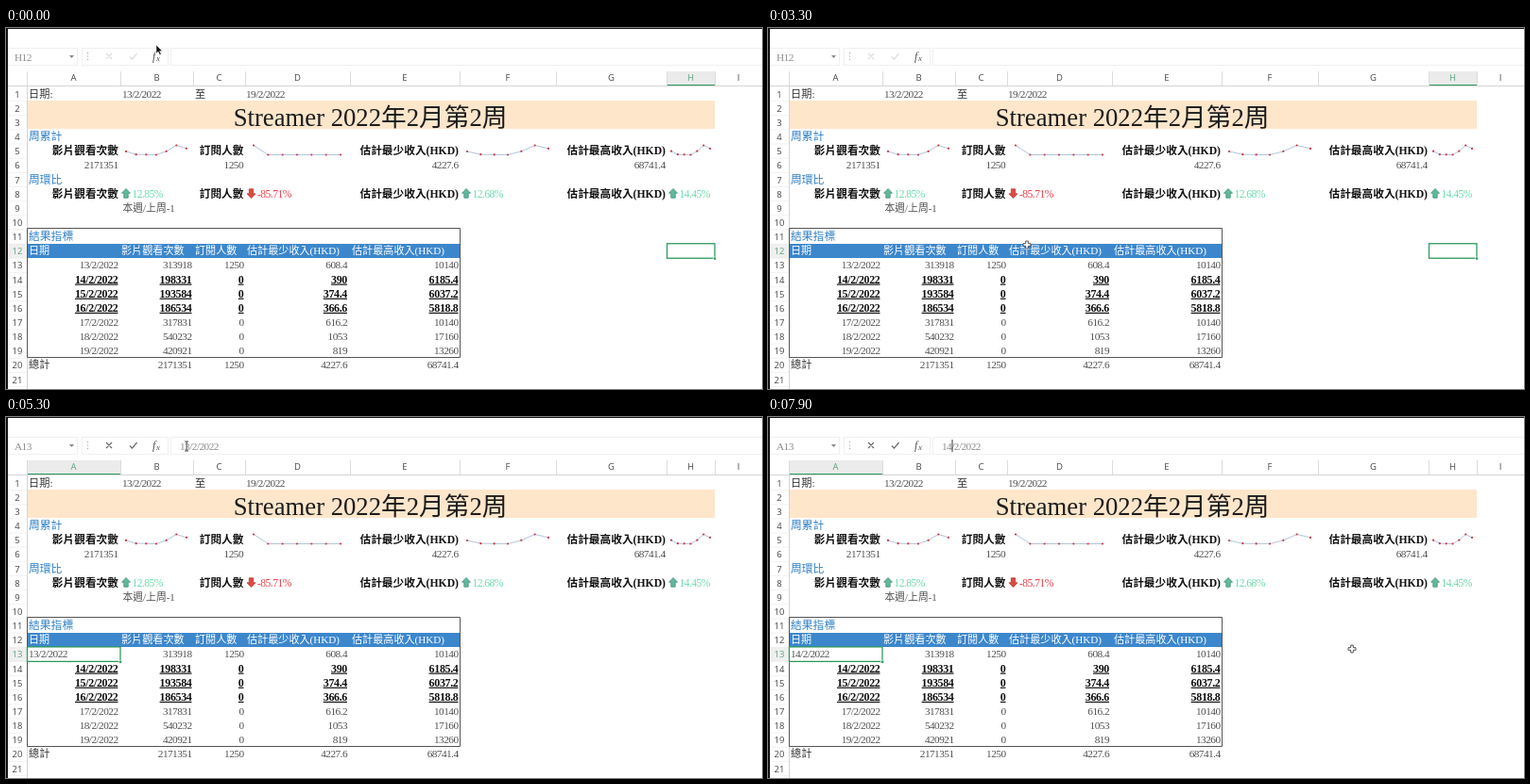
Animation of 800 by 383 pixels, one loop 8 s. Source, as an HTML page:

```html
<!DOCTYPE html>
<html lang="zh-Hant">
<head>
<meta charset="utf-8">
<title>Weekly sheet</title>
<style>
  html, body { margin: 0; width: 100%; height: 100%; overflow: hidden; background: #fff; }
  svg { display: block; width: 800px; height: 383px; }
  text { font: 300 11.3px "Liberation Serif", "Noto Sans CJK TC", "Noto Sans CJK JP", serif; letter-spacing: -.55px; fill: #505050; white-space: pre; }
  .cjk, .note, .section, .label, .head, .title, .axis { letter-spacing: 0; }
  .end { text-anchor: end; }
  .cjk { font-size: 11.2px; fill: #333; }
  .note { font-size: 10.8px; }
  .section { font-size: 11.8px; fill: #2f7fc4; }
  .label { font-size: 11.7px; font-weight: 700; fill: #111; }
  .head { font-size: 11.1px; fill: #fff; }
  .strong { font-size: 12px; letter-spacing: -.35px; font-weight: 700; fill: #111; text-decoration: underline; }
  .title { font-size: 26.7px; fill: #1c1c1c; }
  .up { font-size: 11.6px; fill: #6cdcab; }
  .down { font-size: 11.6px; fill: #e8424e; }
  .axis { font: 9.5px "Open Sans", "Noto Sans", sans-serif; fill: #444; text-anchor: middle; }
  .axis.on { fill: #5fa37e; }
  .bar { fill: #8c8c8c; }
  .fx { font-size: 12px; font-style: italic; fill: #555; }
</style>
</head>
<body>
<svg id="stage" viewBox="0 0 800 383"></svg>
<script>
const LOOP = 8000, STEP = 100;
const GREEN = '#2f9a5c';
const stage = document.getElementById('stage');

function add(tag, attrs, text) {
  const el = document.createElementNS('http://www.w3.org/2000/svg', tag);
  set(el, attrs);
  if (text !== undefined) el.textContent = text;
  stage.appendChild(el);
  return el;
}
function set(el, attrs) {
  for (const k in attrs) el.setAttribute(k, attrs[k]);
}
const rect = (x, y, width, height, fill, stroke = 'none') =>
  add('rect', { x, y, width, height, fill, stroke });
const path = (d, stroke, width = 1, fill = 'none') =>
  add('path', { d, stroke, 'stroke-width': width, fill });
const write = (text, x, y, cls = '') => add('text', { x, y, class: cls }, text);
const show = (el, on) => el.setAttribute('visibility', on ? 'visible' : 'hidden');

// Grid geometry
const edges = [22, 121, 198, 253, 364, 480, 582, 699, 750, 801];
const mid = row => 70 + (row - 1) * 15.15;
const cell = (row, text, x, cls) => write(text, x, mid(row) + 3.6, cls);

// Formula bar frames
for (const [x, w] of [[2.5, 73], [80.5, 91], [174.5, 630]]) rect(x, 21.5, w, 18, '#fff', '#f0f0f0');
path('M67 29h5l-2.5 3z', 'none', 0, '#888');
path('M86.5 26v1.2m0 2.2v1.2m0 2.2v1.2', '#aaa', 1.2);
const icons = path('M106 27l6 6m0-6l-6 6M131 30.5l2.5 2.7 5-6.2', '#ddd', 1.2);
write('f', 155, 34, 'fx');
write('x', 159, 35, 'fx').style.fontSize = '9px';
const nameBox = write('', 9, 34.5, 'bar');

// Headers
const colMark = rect(0, 46, 0, 15, '#ebebeb');
const colLine = rect(0, 60, 0, 1.5, GREEN);
const rowMark = rect(2, 0, 20, 15.15, '#efefef');
path('M2 61.5H800M22.5 46V383', '#d4d4d4');
const cols = [...'ABCDEFGHI'].map((name, i) => {
  path(`M${edges[i] + .5} 46V61`, '#dcdcdc');
  return write(name, (edges[i] + Math.min(edges[i + 1], 800)) / 2, 55.5, 'axis');
});
const rows = [];
for (let r = 1; r <= 21; r++) {
  path(`M2 ${mid(r) + 7.6}H22`, '#ececec', .7);
  rows[r] = cell(r, r, 12, 'axis');
}

// Report heading
cell(1, '日期:', 24, 'cjk');
cell(1, '13/2/2022', 123);
cell(1, '至', 200, 'cjk');
cell(1, '19/2/2022', 254);
rect(23, 77, 727, 30, '#fee6cb');
write('Streamer 2022年2月第2周', 530.5, 104, 'title end');
cell(4, '周累計', 24, 'section');
cell(7, '周環比', 24, 'section');
cell(9, '本週/上周-1', 123.5, 'note');

// Daily figures: views, subscribers, lowest and highest income
const days = [
  [313918, 1250, 608.4, 10140],
  [198331, 0, 390, 6185.4],
  [193584, 0, 374.4, 6037.2],
  [186534, 0, 366.6, 5818.8],
  [317831, 0, 616.2, 10140],
  [540232, 0, 1053, 17160],
  [420921, 0, 819, 13260]
];
const names = ['影片觀看次數', '訂閱人數', '估計最少收入(HKD)', '估計最高收入(HKD)'];
const totals = days[0].map((_, i) => +days.reduce((sum, d) => sum + d[i], 0).toFixed(1));

function sparkline(values, x0, x1) {
  const lo = Math.min(...values), hi = Math.max(...values);
  const pts = values.map((v, i) => [x0 + (x1 - x0) * i / 6, 134.5 - 10 * (v - lo) / (hi - lo)]);
  path('M' + pts.join('L'), '#a9bdd6', .9);
  for (const [cx, cy] of pts) add('circle', { cx, cy, r: 1.1, fill: '#d0323e' });
}
function trend(x, text, up) {
  const arrow = path('M0-5L4.5-.3H2.2V4.7H-2.2V-.3H-4.5z', up ? '#3f8f78' : '#b93a36', .8, up ? '#62b99d' : '#dc4a43');
  arrow.setAttribute('transform', `translate(${x} 175.5) scale(1 ${up ? 1 : -1})`);
  cell(8, text, x + 6.5, up ? 'up' : 'down');
}
const cards = [
  [119, 127, 191, '12.85%'],
  [251.5, 262, 354, '-85.71%'],
  [479, 488, 574, '12.68%'],
  [698, 704, 745, '14.45%']
];
cards.forEach(([right, x0, x1, change], i) => {
  cell(5, names[i], right, 'label end');
  cell(6, totals[i], right - .5, 'end');
  cell(8, names[i], right, 'label end');
  sparkline(days.map(d => d[i]), x0, x1);
  trend(right + 8, change, change[0] !== '-');
});

// Result table
cell(11, '結果指標', 24, 'section');
rect(22, 229, 458, 15, '#3c87cc');
cell(12, '日期', 24, 'head');
[122, 200, 255, 366].forEach((x, i) => cell(12, names[i], x, 'head'));
const rights = [196.5, 251.5, 361, 478.5];
let firstDate;
days.forEach((day, i) => {
  const cls = i > 0 && i < 4 ? 'strong end' : 'end';
  const date = cell(13 + i, `${13 + i}/2/2022`, 118.5, cls);
  if (!i) firstDate = date;
  day.forEach((v, c) => cell(13 + i, v, rights[c], cls));
});
cell(20, '總計', 24, 'cjk');
totals.forEach((v, c) => cell(20, v, rights[c], 'end'));
path('M22.5 349.5V212.5H480.5V349.5z', '#555');

// Selection, edit line and pointers
const box = rect(0, 0, 0, 15.5, 'none', GREEN);
box.setAttribute('stroke-width', 1.3);
const handle = rect(0, 0, 3, 3, GREEN, '#fff');
handle.setAttribute('stroke-width', .6);
const pick = rect(189, 24, 5.5, 13, '#c4c4c4');
const formula = write('', 184, 34.5, 'bar');
const caret = rect(194.5, 24, 1, 13, '#333');

const pointers = {
  arrow: path('M0 0V9l2.1-1.9 1.5 3.3 1.6-.7-1.5-3.2H6.5z', '#fff', .5, '#111'),
  cross: path('M-1.3-4h2.6v2.7H4v2.6H1.3V4h-2.6V1.3H-4v-2.6h2.7z', '#444', .9, '#fff'),
  beam: path('M-2-5h4M0-5V5M-2 5h4', '#333', .9)
};

// Pointer route: time, x, y
const route = [
  [0, 159, 18], [400, 290, 80], [900, 443, 161], [1100, 443, 161],
  [1900, 746, 250], [2100, 774, 324], [2400, 746, 250], [2800, 690, 240],
  [3300, 274, 230], [3700, 100, 240], [4000, 76, 252], [4200, 76, 252],
  [4600, 213, 76], [4900, 194, 31], [5600, 189, 31], [6000, 282, 133],
  [6700, 618, 246], [LOOP, 618, 246]
];
function pointerAt(t) {
  const i = route.findIndex(k => k[0] > t);
  const [t0, x0, y0] = route[i - 1], [t1, x1, y1] = route[i];
  const p = (t - t0) / (t1 - t0);
  return [x0 + (x1 - x0) * p, y0 + (y1 - y0) * p];
}

function select(col, row) {
  const x = edges[col], w = edges[col + 1] - x, y = mid(row) - 7.6;
  set(colMark, { x, width: w });
  set(colLine, { x, width: w });
  set(rowMark, { y });
  set(box, { x: x + .5, y: y - .3, width: w - .5 });
  set(handle, { x: x + w - 1.5, y: y + 14 });
  cols.forEach((el, i) => el.classList.toggle('on', i === col));
  rows.forEach((el, i) => el.classList.toggle('on', i === row));
}

function draw(time) {
  const t = Math.floor(time % LOOP / STEP) * STEP;
  const chosen = t >= 4100, editing = t >= 5000;
  const value = t < 6800 ? '13/2/2022' : t < 7100 ? '1/2/2022' : '14/2/2022';

  if (chosen) select(0, 13); else select(7, 12);
  nameBox.textContent = chosen ? 'A13' : 'H12';
  formula.textContent = chosen ? value : '';
  firstDate.textContent = value;
  set(firstDate, { x: editing ? 24 : 118.5, class: editing ? '' : 'end' });
  set(icons, { stroke: editing ? '#666' : '#ddd' });

  show(pick, t >= 5500 && t < 6800);
  show(caret, editing && (t < 5500 || t >= 6800) && (t + 200) % 1000 < 500);
  set(caret, { x: t >= 7100 ? 194.5 : 189 });

  const [x, y] = pointerAt(t);
  const kind = t <= 1200 ? 'arrow' : y < 42 ? 'beam' : 'cross';
  for (const k in pointers) show(pointers[k], k === kind);
  set(pointers[kind], { transform: `translate(${x} ${y})` });
}

// Screen edges
rect(0, 0, 800, 1, '#111');
rect(0, 0, 2, 383, '#111');

const start = performance.now();
(function tick() {
  draw(performance.now() - start);
  requestAnimationFrame(tick);
})();
</script>
</body>
</html>
```
